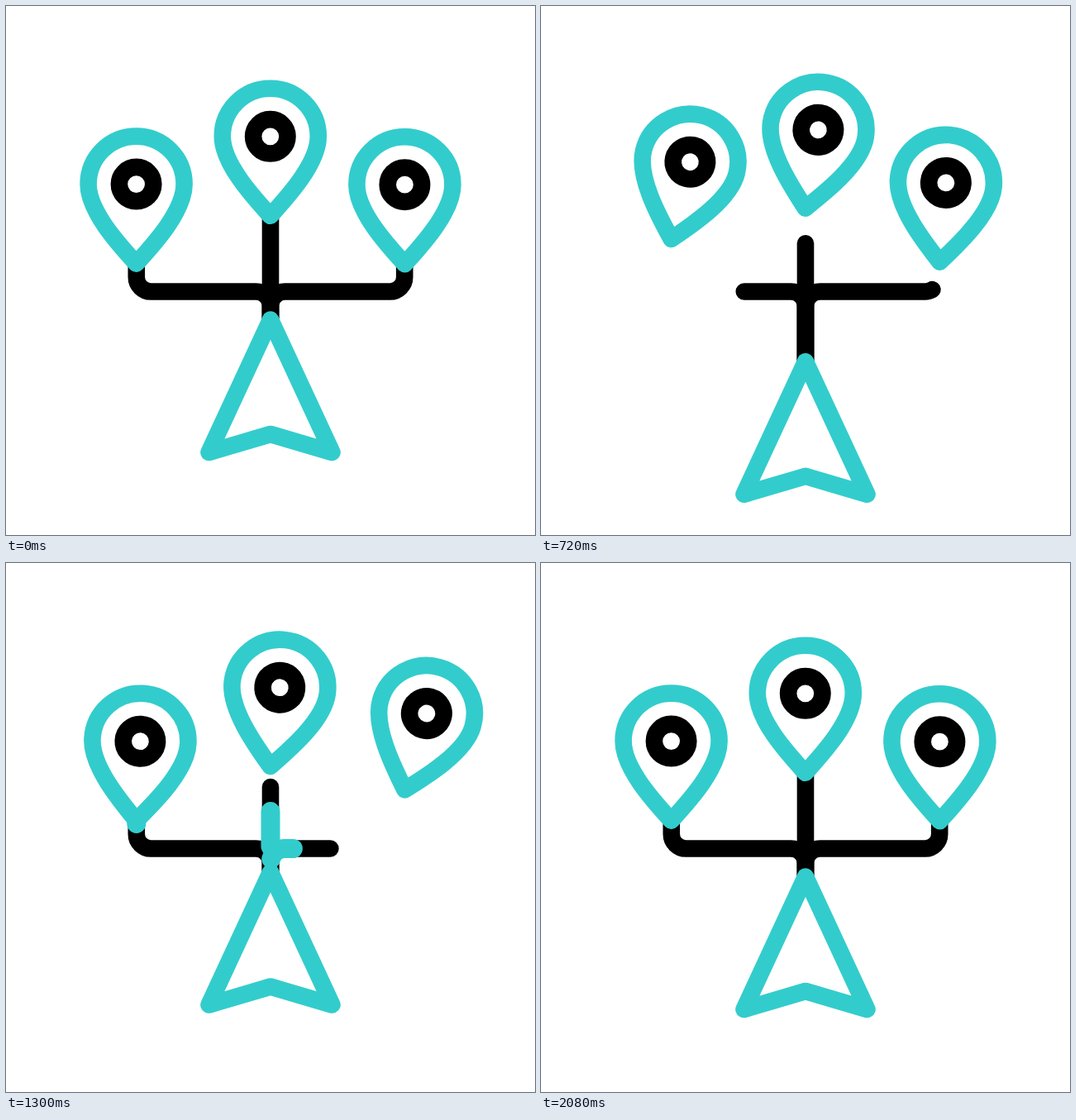
An HTML page for the animation above (3.6 s loop, 640 by 640 pixels).

```html
<!DOCTYPE html>
<html lang="en">
<head>
<meta charset="utf-8">
<title>Branching routes</title>
<style>
  html, body { margin: 0; width: 100%; height: 100%; overflow: hidden; background: #fff; }
  svg { display: block; width: 100%; height: 100%; }
  path, circle { fill: none; stroke: #3cc; stroke-width: 20.6; stroke-linecap: round; stroke-linejoin: round; }
  .ink { stroke: #000; }
  .pulse { stroke-width: 23; }
  #arrow { fill: #fff; }
</style>
</head>
<body>
<svg viewBox="0 0 640 640">
  <g id="lines"></g>
  <g id="pulses"></g>
  <path id="arrow" d="M320 379.5L394.5 540L320 518L245.5 540Z"/>
  <g id="pins"></g>
</svg>
<script>
const LOOP = 3600;
const STAGGER = 170;
const $ = id => document.getElementById(id);

function add(parent, tag, attrs = {}) {
  const el = document.createElementNS('http://www.w3.org/2000/svg', tag);
  for (const name in attrs) el.setAttribute(name, attrs[name]);
  return parent.appendChild(el);
}

// Progress 0 to 1 with a soft start and end.
function ease(t, [start, duration]) {
  const u = Math.min(1, Math.max(0, (t - start) / duration));
  return (1 - Math.cos(Math.PI * u)) / 2;
}

// Eases from each [time, value] key to the next.
const follow = (t, keys) => keys.reduce((value, [time, next], i) =>
  i ? value + (next - keys[i - 1][1]) * ease(t, [keys[i - 1][0], time - keys[i - 1][0]]) : next, 0);

const arrowDrop = t => follow(t, [[167, 0], [767, 51.5], [820, 51.5], [1345, -6.5], [1520, 0]]);

// A pin leans over, swings back past upright and settles.
const tilt = t => follow(t, [[80, 0], [930, 16], [1050, 16], [1220, -3.7], [1320, 3.5], [1640, 0]]);

// It drifts up slowly, jumps, then drops back.
const lift = t => 14 * ease(t, [150, 600]) ** 1.5 + 25 * ease(t, [540, 310]) - 39 * ease(t, [930, 285]);

function sideRoute(dir) {
  const x = offset => 320 + dir * offset;
  const [first, second] = dir > 0 ? [1, 0] : [0, 1];
  return `M320 431V363A17.5 17.5 0 0 ${first} ${x(17.5)} 345.5H${x(144.7)}`
    + `A17.5 17.5 0 0 ${second} ${x(162.2)} 328V312`;
}

// Each [start, duration]: the line withdraws by reach and returns; a pulse runs along it from tail to head.
const branches = [
  { x: 157.6, y: 311.6, route: sideRoute(-1), reach: 117,
    withdraw: [145, 640], restore: [840, 360], head: [790, 500], tail: [830, 510] },
  { x: 319.8, y: 253.8, route: 'M320 431V254', reach: 43,
    withdraw: [330, 570], restore: [1120, 320], head: [920, 580], tail: [920, 765] },
  { x: 482.4, y: 312.2, route: sideRoute(1), reach: 120.5,
    withdraw: [480, 670], restore: [1270, 250], head: [1050, 580], tail: [1050, 715] }
];

for (const b of branches) {
  b.line = add($('lines'), 'path', { d: b.route, class: 'ink' });
  b.pulse = add($('pulses'), 'path', { d: b.route, class: 'pulse' });
  b.pin = add($('pins'), 'g');
  add(b.pin, 'path', { d: 'M0 0C-20 -22 -58 -63 -58 -96A58 58 0 0 1 58 -96C58 -63 20 -22 0 0Z' });
  add(b.pin, 'circle', { cy: -96, r: 20.7, class: 'ink' });
  b.length = b.line.getTotalLength();
}

function draw(t) {
  $('arrow').setAttribute('transform', `translate(0 ${arrowDrop(t)})`);
  branches.forEach((b, i) => {
    const local = t - i * STAGGER;
    b.pin.setAttribute('transform', `translate(${b.x} ${b.y - lift(local)}) rotate(${tilt(local)})`);

    const withdrawn = b.reach * (ease(t, b.withdraw) - ease(t, b.restore));
    b.line.setAttribute('stroke-dasharray', `${b.length - withdrawn} 999`);

    const head = b.length * ease(t, b.head), tail = b.length * ease(t, b.tail);
    b.pulse.setAttribute('visibility', head > 0 && tail < b.length ? 'visible' : 'hidden');
    b.pulse.setAttribute('stroke-dasharray', `${Math.max(.01, head - tail)} 999`);
    b.pulse.setAttribute('stroke-dashoffset', -tail);
  });
}

const begin = performance.now();
function frame() {
  draw((performance.now() - begin) % LOOP);
  requestAnimationFrame(frame);
}
frame();
</script>
</body>
</html>
```
